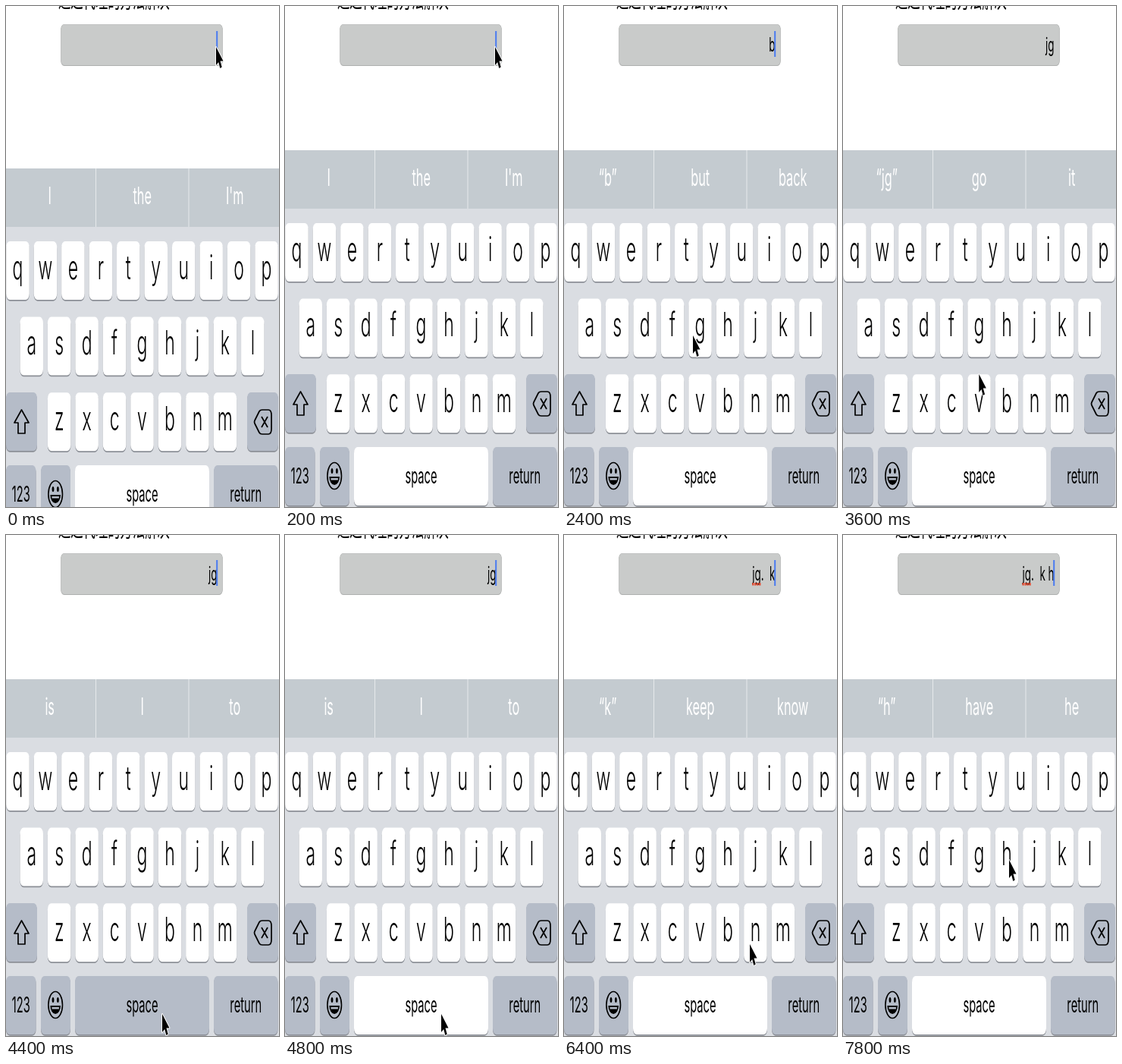
These frames come from a looping animation (360x660 px, 8000 ms). An HTML page with a canvas:

```html
<!DOCTYPE html>
<html lang="en">
<head>
<meta charset="utf-8">
<title>Right-aligned text field</title>
<style>
  html, body { margin: 0; width: 100%; height: 100%; overflow: hidden; background: #fff; }
  canvas { display: block; }
</style>
</head>
<body>
<canvas id="stage" width="360" height="660"></canvas>
<script>
const ctx = document.getElementById('stage').getContext('2d');
const LOOP = 8000, STEP = 200, TRAVEL = 600, HOLD = 500;
const SCALE_X = 0.96, SCALE_Y = 1.84; // the phone screen is shown narrow and tall
const FONT = 'Inter, Roboto, sans-serif';
const CJK = '"Noto Sans CJK SC", "Noto Sans CJK", sans-serif';
const WHITE = '#fff', GREY = '#b5bcc8', INK = '#000';

// Each tap places the pointer, then sets the field text and the suggestions.
const spot = { del: [341, 530], space: [206, 631], b: [214, 530], g: [170, 434], j: [252, 440], k: [284, 447], h: [219, 428] };
const taps = [
  { at: 0, point: [277, 54], text: '', hints: "I the I'm" },
  { at: 1000, key: 'del', text: '', hints: "I the I'm" },
  { at: 1800, key: 'space', text: '', hints: "I the I'm" },
  { at: 2200, key: 'b', text: 'b', hints: '“b” but back' },
  { at: 2400, key: 'g', text: 'b', hints: '“b” but back' },
  { at: 3000, key: 'j', text: 'j', hints: '“j” just join' },
  { at: 3400, key: 'g', text: 'jg', hints: '“jg” go it' },
  { at: 4000, key: 'space', text: 'jg', hints: 'is I to' },
  { at: 5000, key: 'space', text: 'jg.', hints: "I the I'm" },
  { at: 6200, key: 'k', text: 'jg.  k', hints: '“k” keep know' },
  { at: 6600, key: 'space', text: 'jg.  k', hints: 'is I to' },
  { at: 7400, key: 'h', text: 'jg.  k h', hints: '“h” have he' },
];
const pointOf = tap => tap.point || spot[tap.key];

function pointerAt(t, current, next) {
  if (!next) return pointOf(current);
  const leave = Math.max(current.at, next.at - TRAVEL);
  const u = Math.max(0, (t - leave) / (next.at - leave));
  const eased = u * u * (3 - 2 * u);
  const to = pointOf(next);
  return pointOf(current).map((from, axis) => from + (to[axis] - from) * eased);
}

function text(str, x, y, size, { color = INK, align = 'center', family = FONT, weight = 400 } = {}) {
  ctx.save();
  ctx.translate(x, y);
  ctx.scale(SCALE_X, SCALE_Y);
  ctx.font = `${weight} ${size}px ${family}`;
  ctx.textAlign = align;
  ctx.fillStyle = color;
  ctx.fillText(str, 0, 0);
  ctx.restore();
}

function box(x, y, w, h, color) {
  ctx.fillStyle = color;
  ctx.beginPath();
  ctx.roundRect(x, y, w, h, { x: 4.8, y: 8 });
  ctx.fill();
}

function key(x, y, w, color) {
  box(x, y + 1.7, w, 77, '#8b8f96');
  box(x, y, w, 77, color);
}

function labelKey(x, w, color, label) {
  key(x, 581, w, color);
  text(label, x + w / 2, 629, 15.3);
}

function shape(d, { fill, stroke = INK, width = 1.7 }) {
  const path = new Path2D(d);
  ctx.lineJoin = 'round';
  ctx.lineWidth = width;
  ctx.strokeStyle = stroke;
  ctx.stroke(path);
  if (fill) {
    ctx.fillStyle = fill;
    ctx.fill(path);
  }
}

function oval(x, y, rx, ry, end = 2 * Math.PI) {
  ctx.beginPath();
  ctx.ellipse(x, y, rx, ry, 0, 0, end);
  ctx.closePath();
}

function deleteIcon(pressed) {
  shape('M334 510Q335 508 338 508H346Q350 508 350 515V533Q350 540 346 540H338Q335 540 334 538L328 526Q327 524 328 522Z',
    { fill: pressed && INK });
  shape('M337 517L345 531M345 517L337 531', { stroke: pressed ? WHITE : INK });
}

function emojiIcon() {
  ctx.lineWidth = 1.6;
  ctx.strokeStyle = ctx.fillStyle = INK;
  oval(65.2, 619, 9.3, 17.5);
  ctx.stroke();
  for (const x of [62, 68.4]) {
    oval(x, 612.5, 1.4, 3.6);
    ctx.fill();
  }
  oval(65.2, 620, 6.8, 11, Math.PI);
  ctx.fill();
  ctx.fillStyle = GREY;
  ctx.fillRect(60.5, 622, 9.4, 2.5);
}

function field(content, caretOn) {
  const right = 278.5;
  text('通过代理的方法解决', 69, 2, 17, { align: 'left', family: CJK });
  box(72, 24, 214, 55, '#aeb0af');
  box(72.3, 24.3, 213.4, 53.7, '#c9cbca');
  text(content, right, 59.5, 14, { align: 'right' });
  if (content.startsWith('jg.')) {
    ctx.font = `14px ${FONT}`;
    const widthOf = str => ctx.measureText(str).width * SCALE_X;
    const left = right - widthOf(content);
    ctx.fillStyle = '#e5492f';
    for (let x = 0; x < widthOf('jg') - 1; x += 3) ctx.fillRect(left + x, 63, 2.2, 3.5);
  }
  if (caretOn) {
    ctx.fillStyle = '#4a7bf0';
    ctx.fillRect(277.2, 33, 2, 34);
  }
}

function keyboard(hints, pressed) {
  ctx.fillStyle = '#dadde2';
  ctx.fillRect(0, 190, 360, 480);
  ctx.fillStyle = '#c4cbd0';
  ctx.fillRect(0, 190, 360, 77);
  ctx.fillStyle = '#e6e9eb';
  for (const x of [118, 240.5]) ctx.fillRect(x, 190, 1, 77);
  hints.split(' ').forEach((word, i) => text(word, 57.7 + 122 * i, 237, 17, { color: WHITE }));

  const pitch = 36.45, width = 30.5;
  ['qwertyuiop', 'asdfghjkl', 'zxcvbnm'].forEach((letters, row) => {
    const y = 286 + 99.6 * row;
    const left = 182.5 - pitch * letters.length / 2;
    [...letters].forEach((letter, i) => {
      const x = left + pitch * i;
      key(x, y, width, WHITE);
      text(letter, x + width / 2, y + 49.8, 24, { weight: 300 });
    });
  });

  key(0, 485, 41, GREY);
  key(318, 485, 41, pressed === 'del' ? WHITE : GREY);
  key(46, 581, 39, GREY);
  labelKey(0, 39.5, GREY, '123');
  labelKey(91, 177, pressed === 'space' ? GREY : WHITE, 'space');
  labelKey(274, 84.5, GREY, 'return');
  shape('M20.5 508L30 525H25V539H16V525H11Z', {});
  deleteIcon(pressed === 'del');
  emojiIcon();
}

function pointer([x, y]) {
  ctx.save();
  ctx.translate(x, y);
  shape('M0 0V24L3.2 20L5.3 28L7.7 26.5L5.5 18.5H9.5Z', { fill: INK, stroke: WHITE, width: 1.8 });
  ctx.restore();
}

function draw(now) {
  const t = Math.floor((now % LOOP) / STEP) * STEP;
  const index = taps.findLastIndex(tap => tap.at <= t);
  const current = taps[index];
  ctx.fillStyle = WHITE;
  ctx.fillRect(0, 0, 360, 660);
  field(current.text, t % 1000 !== 600);
  ctx.save();
  if (t < STEP) ctx.translate(0, 24); // keyboard still sliding in
  keyboard(current.hints, t - current.at < HOLD && current.key);
  ctx.restore();
  pointer(pointerAt(t, current, taps[index + 1]));
}

const start = performance.now();
function tick() {
  draw(performance.now() - start);
  requestAnimationFrame(tick);
}
tick();
</script>
</body>
</html>
```
